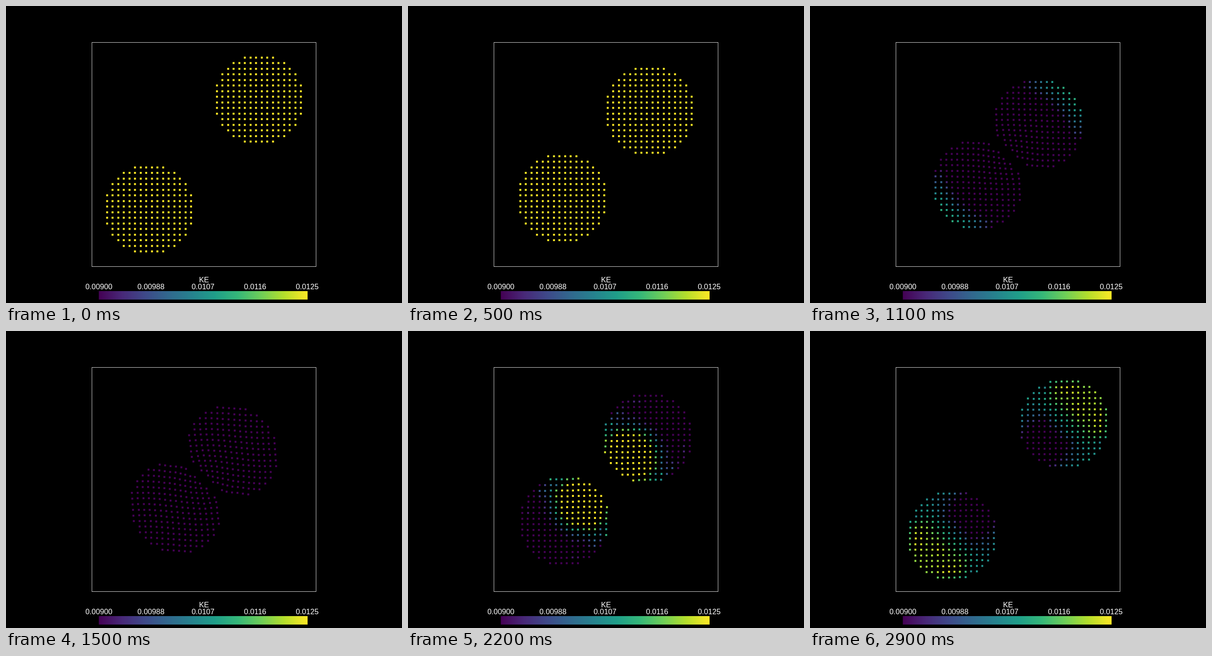
An HTML page with a canvas that plays this animation: 864x648 px, repeating every 3000 ms.

```html
<!DOCTYPE html>
<html lang="en">
<head>
<meta charset="utf-8">
<title>Two elastic disks</title>
<style>
  html, body { margin: 0; width: 100%; height: 100%; overflow: hidden; background: #000; }
  canvas { display: block; }
</style>
</head>
<body>
<canvas id="stage" width="864" height="648"></canvas>
<script>
const ctx = document.getElementById('stage').getContext('2d');

// Material point method: two elastic disks meeting on a shared grid
const CELL = 0.05, NODES = 21, DT = 0.001, STEPS_PER_FRAME = 100, FRAMES = 30;
const RADIUS = 0.2, SPACING = CELL / 2, DENSITY = 1000, SPEED = 0.1;
const YOUNG = 1000, POISSON = 0.3, FLIP = 0.99;
const LAMBDA = YOUNG * POISSON / ((1 + POISSON) * (1 - 2 * POISSON));
const SHEAR = YOUNG / (2 * (1 + POISSON));
const MASS = DENSITY * SPACING * SPACING;

const particles = [];
function addDisk(center, speed) {
  for (let i = -7.5; i < 8; i++) {
    for (let j = -7.5; j < 8; j++) {
      const dx = i * SPACING, dy = j * SPACING;
      if (Math.hypot(dx, dy) > RADIUS) continue;
      particles.push({
        x: center + dx, y: center + dy, vx: speed, vy: speed,
        sxx: 0, syy: 0, sxy: 0, volume: SPACING * SPACING
      });
    }
  }
}
addDisk(0.255, SPEED);
addDisk(0.745, -SPEED);

const makeGrid = () => new Float64Array(NODES * NODES);
const mass = makeGrid(), momX = makeGrid(), momY = makeGrid();
const forceX = makeGrid(), forceY = makeGrid();

// Calls visit(node, weight, gradientX, gradientY) for the four corners of the cell
function visitNodes(p, visit) {
  const i = Math.floor(p.x / CELL), j = Math.floor(p.y / CELL);
  const u = p.x / CELL - i, v = p.y / CELL - j;
  for (let b = 0; b < 2; b++) {
    for (let a = 0; a < 2; a++) {
      const wx = a ? u : 1 - u, wy = b ? v : 1 - v;
      visit((j + b) * NODES + i + a, wx * wy,
        (a ? wy : -wy) / CELL, (b ? wx : -wx) / CELL);
    }
  }
}

function toGrid(p) {
  visitNodes(p, (n, w, gx, gy) => {
    mass[n] += w * MASS;
    momX[n] += w * MASS * p.vx;
    momY[n] += w * MASS * p.vy;
    forceX[n] -= p.volume * (p.sxx * gx + p.sxy * gy);
    forceY[n] -= p.volume * (p.sxy * gx + p.syy * gy);
  });
}

function fromGrid(p) {
  let vx = 0, vy = 0, dvx = 0, dvy = 0;
  let lxx = 0, lxy = 0, lyx = 0, lyy = 0;
  visitNodes(p, (n, w, gx, gy) => {
    if (mass[n] < 1e-12) return;
    const ax = forceX[n] / mass[n] * DT, ay = forceY[n] / mass[n] * DT;
    const nx = momX[n] / mass[n] + ax, ny = momY[n] / mass[n] + ay;
    vx += w * nx; vy += w * ny;
    dvx += w * ax; dvy += w * ay;
    lxx += nx * gx; lxy += nx * gy;
    lyx += ny * gx; lyy += ny * gy;
  });
  p.x += vx * DT;
  p.y += vy * DT;
  p.vx = (1 - FLIP) * vx + FLIP * (p.vx + dvx);
  p.vy = (1 - FLIP) * vy + FLIP * (p.vy + dvy);
  const bulk = LAMBDA * (lxx + lyy);
  p.sxx += DT * (bulk + 2 * SHEAR * lxx);
  p.syy += DT * (bulk + 2 * SHEAR * lyy);
  p.sxy += DT * SHEAR * (lxy + lyx);
  p.volume *= (1 + DT * lxx) * (1 + DT * lyy) - DT * DT * lxy * lyx;
}

function step() {
  for (const field of [mass, momX, momY, forceX, forceY]) field.fill(0);
  particles.forEach(toGrid);
  particles.forEach(fromGrid);
}

// Viridis colours over the energy range
const KE_MIN = 0.009, KE_MAX = 0.0125;
const VIRIDIS = [
  [68, 1, 84], [72, 40, 120], [62, 73, 137], [49, 104, 142], [38, 130, 142],
  [31, 158, 137], [53, 183, 121], [110, 206, 88], [181, 222, 43], [253, 231, 37]
];
const rgb = c => `rgb(${c.map(Math.round).join()})`;
function viridis(t) {
  const s = Math.min(1, Math.max(0, t)) * (VIRIDIS.length - 1);
  const i = Math.min(VIRIDIS.length - 2, Math.floor(s));
  return rgb(VIRIDIS[i].map((c, k) => c + (VIRIDIS[i + 1][k] - c) * (s - i)));
}

function snapshot() {
  return particles.map(p => {
    const energy = KE_MAX * (p.vx * p.vx + p.vy * p.vy) / (2 * SPEED * SPEED);
    // tiny offset keeps undisturbed points at the top of the scale
    return { x: p.x, y: p.y, color: viridis((energy - KE_MIN) / (KE_MAX - KE_MIN) + 1e-6) };
  });
}

const frames = [snapshot()];
while (frames.length < FRAMES) {
  for (let s = 0; s < STEPS_PER_FRAME; s++) step();
  frames.push(snapshot());
}

// Points sit on the pixel raster of a 1024 px wide view
const BOX = { left: 187.5, top: 79.5, size: 489 }, RASTER = 864 / 1024, POINT = 5;
const snap = v => Math.round(v / RASTER - POINT / 2) * RASTER;

const barFill = ctx.createLinearGradient(202.5, 0, 658, 0);
VIRIDIS.forEach((c, i) => barFill.addColorStop(i / (VIRIDIS.length - 1), rgb(c)));

function drawLegend() {
  ctx.fillStyle = barFill;
  ctx.fillRect(202.5, 622, 455.5, 18.5);
  ctx.fillStyle = '#fff';
  ctx.font = '16.3px "Liberation Sans", Arial, sans-serif';
  ctx.textAlign = 'center';
  ctx.fillText('KE', 432, 603);
  ['0.00900', '0.00988', '0.0107', '0.0116', '0.0125']
    .forEach((label, i) => ctx.fillText(label, 202.7 + i * 113.6, 618));
}

function draw(time) {
  ctx.fillStyle = '#000';
  ctx.fillRect(0, 0, 864, 648);
  ctx.strokeStyle = '#d2d2d2';
  ctx.strokeRect(BOX.left, BOX.top, BOX.size, BOX.size);
  for (const p of frames[Math.floor(time / 100) % FRAMES]) {
    ctx.fillStyle = p.color;
    ctx.fillRect(snap(BOX.left + p.x * BOX.size),
      snap(BOX.top + (1 - p.y) * BOX.size), POINT * RASTER, POINT * RASTER);
  }
  drawLegend();
  requestAnimationFrame(draw);
}
requestAnimationFrame(draw);
</script>
</body>
</html>
```
